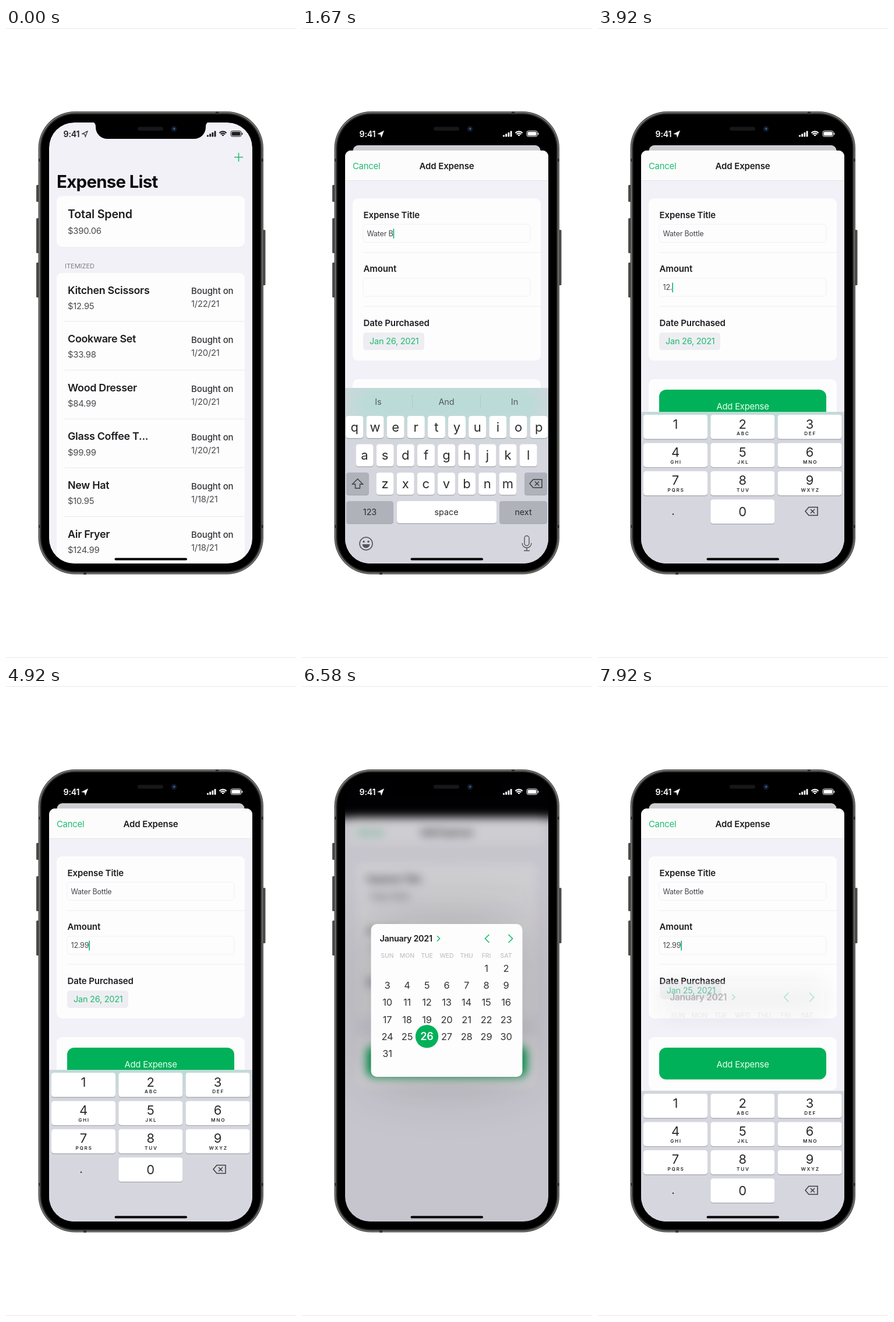
Write an HTML page with a canvas that moves like this. It is 498x1080 px and loops after 8 s.

```html
<!DOCTYPE html>
<html lang="en">
<head>
<meta charset="utf-8">
<title>Expense List</title>
<style>
  html, body { margin: 0; width: 100%; height: 100%; overflow: hidden; background: #fff; }
  canvas { display: block; width: 498px; height: 1080px; }
</style>
</head>
<body>
<canvas id="stage" width="498" height="1080"></canvas>
<script>
const W = 498, H = 1080, LOOP = 8000;
const GREEN = '#00b159', TINT = '#1dbb70', INK = '#1d1d20', GROUND = '#f2f1f7', CARD = '#fdfdfe';
const SHEET_OPEN = 542, SWITCH = 2400, PICKER_OPEN = 5530, DAY_TAP = 7000, PICKER_CLOSE = 7716;
const main = document.getElementById('stage').getContext('2d');
const buffer = Object.assign(document.createElement('canvas'), { width: W, height: H });
const back = buffer.getContext('2d');
let g = main;

const clamp = v => Math.max(0, Math.min(1, v));
const lerp = (a, b, k) => a + (b - a) * k;
// Critically damped spring from 0 to 1, starting at `start` ms.
const spring = (t, start) => {
  const x = Math.max(0, t - start) * 0.017;
  return 1 - (1 + x) * Math.exp(-x);
};

function text(s, x, y, size, color = INK, weight = 400, spacing = 0, align = 'left') {
  g.font = `${weight} ${size}px Inter, sans-serif`;
  g.letterSpacing = spacing + 'px';
  g.textAlign = align;
  g.fillStyle = color;
  g.fillText(s, x, y + size * 0.364);
  return g.measureText(s).width;
}
const label = (s, x, y, size, color, weight, spacing) => text(s, x, y, size, color, weight, spacing, 'center');

function box(x, y, w, h, r, fill, stroke) {
  g.beginPath();
  g.roundRect(x, y, w, h, r);
  if (fill) { g.fillStyle = fill; g.fill(); }
  if (stroke) { g.strokeStyle = stroke; g.lineWidth = 1; g.stroke(); }
}
function line(points, color, width = 1.5, fill) {
  g.beginPath();
  points.forEach(([x, y], i) => i ? g.lineTo(x, y) : g.moveTo(x, y));
  if (fill) { g.closePath(); g.fillStyle = fill; g.fill(); }
  g.strokeStyle = color;
  g.lineWidth = width;
  g.stroke();
}
function arc(x, y, r, from, to, color, width = 1.4) {
  g.beginPath();
  g.arc(x, y, r, from * Math.PI, to * Math.PI);
  g.strokeStyle = color;
  g.lineWidth = width;
  g.stroke();
}
function disc(x, y, r, color) {
  g.beginPath();
  g.arc(x, y, r, 0, 7);
  g.fillStyle = color;
  g.fill();
}
function group(draw) { g.save(); draw(); g.restore(); }

// ---- Expense list ----
const EXPENSES = [
  ['Kitchen Scissors', '$12.95', '1/22/21'], ['Cookware Set', '$33.98', '1/20/21'],
  ['Wood Dresser', '$84.99', '1/20/21'], ['Glass Coffee T...', '$99.99', '1/20/21'],
  ['New Hat', '$10.95', '1/18/21'], ['Air Fryer', '$124.99', '1/18/21'],
];
function drawList(q) {
  group(() => {
    const scale = lerp(1, 0.9226, q);
    g.translate(248.5, 162 + 39 * q);
    g.scale(scale, scale);
    g.translate(-248.5, -162);
    const radius = lerp(43, 10, q);
    box(74, 162, 349, 780, radius, GROUND);
    const plus = q > 0.4 ? '#a9a9b4' : TINT;
    line([[392, 221.5], [407, 221.5]], plus);
    line([[399.5, 214], [399.5, 229]], plus);
    text('Expense List', 87, 263.5, 29.5, '#0c0c0e', 700, -0.75);
    box(87, 288, 323, 87, 9, CARD);
    text('Total Spend', 106, 319, 19.7, INK, 600, -0.2);
    text('$390.06', 106, 348, 14.8, '#4b4b4f', 400, -0.2);
    text('ITEMIZED', 101, 408, 11, '#7d7d83');
    box(87, 420, 323, 560, 9, CARD);
    EXPENSES.forEach(([name, price, date], i) => {
      const y = 83.6 * i;
      text(name, 106, 449 + y, 17.9, INK, 600, -0.3);
      text(price, 106, 476.5 + y, 14.8, '#4b4b4f', 400, -0.2);
      text('Bought on', 318, 451 + y, 15, '#333337', 500, -0.1);
      text(date, 318, 473 + y, 14.8, '#4b4b4f', 400, -0.2);
      line([[100, 503 + y], [410, 503 + y]], '#e9e9ed', 1);
    });
    if (q) box(74, 162, 349, 780, radius, `rgba(0,0,0,${0.15 * q})`);
  });
}

// ---- Typing ----
const TITLE = 'Water Bottle';
const PRESSES = [[3150, '1'], [3450, '2'], [3750, '.'], [4220, '9'], [4580, '9']];
const titleLength = t => Math.max(0, Math.min(TITLE.length, Math.floor((t - 980) / 95)));
const amountAt = t => PRESSES.filter(p => p[0] <= t).map(p => p[1]).join('');

function caretVisible(t) {
  const last = Math.max(SHEET_OPEN, t >= SWITCH ? SWITCH : 0,
    t > 1075 ? Math.min(t, 2120) : 0, ...PRESSES.map(p => p[0]).filter(x => x <= t));
  return t > PICKER_CLOSE || (t - last) % 1000 < 560;
}

// ---- Add Expense sheet ----
function drawField(name, value, y, caret) {
  text(name, 105.5, y - 31.5, 15, INK, 600, -0.1);
  box(105, y - 15.5, 287, 31, 5, CARD, '#f1f1f4');
  const width = value ? text(value, 111.5, y, 12.5, '#47474b', 400, -0.2) : 0;
  if (caret) box(111.5 + width, y - 8, 1.8, 17, 1, TINT);
}
function drawSheet(t, top, p) {
  group(() => {
    g.translate(0, top - 210);
    box(74, 210, 349, 800, [10, 10, 0, 0], GROUND);
    box(74, 210, 349, 51, [10, 10, 0, 0], '#fcfcfd');
    line([[74, 261.5], [423, 261.5]], '#e6e6ea', 1);
    text('Cancel', 87, 236.5, 14.8, TINT, 400, -0.2);
    label('Add Expense', 248.5, 236.5, 15, INK, 600, -0.1);
    box(87, 292, 323, 278, 9, CARD);
    const blink = caretVisible(t);
    drawField('Expense Title', TITLE.slice(0, titleLength(t)), 352, t < SWITCH && blink);
    drawField('Amount', amountAt(t), 444.5, t >= SWITCH && blink);
    line([[105, 385], [410, 385]], '#ededf1', 1);
    line([[105, 477], [410, 477]], '#ededf1', 1);
    group(() => {
      g.globalAlpha = clamp(1.15 - p * 1.3);
      g.translate(p * 12, -110 * p);
      box(105, 522, 105, 30, 5, '#eeeef2');
      text(t > DAY_TAP ? 'Jan 25, 2021' : 'Jan 26, 2021', 116, 537, 14.5, TINT, 400, -0.25);
    });
    text('Date Purchased', 105.5, 505.5, 15, INK, 600, -0.1);
    box(87, 602, 323, 91, 9, CARD);
    box(105, 620, 287, 54.5, 12, GREEN);
    label('Add Expense', 248.5, 648.5, 14.8, '#e9fff3', 400, -0.2);
  });
}

// ---- Keyboards ----
function key(x, y, w, h, fill = '#fff') {
  box(x, y + 1.2, w, h, 4.5, '#a2a4ab');
  box(x, y, w, h, 4.5, fill);
}
function backspace(x, y) {
  line([[x - 11, y], [x - 5, y - 7], [x + 10, y - 7], [x + 10, y + 7], [x - 5, y + 7], [x - 11, y], [x - 5, y - 7]], '#3b3b3f');
  line([[x - 2, y - 3.5], [x + 5, y + 3.5]], '#3b3b3f');
  line([[x - 2, y + 3.5], [x + 5, y - 3.5]], '#3b3b3f');
}
function drawLetters(t) {
  const upper = titleLength(t) === 0, gray = '#b0b2bb';
  const words = upper ? ['I', 'Yeah', 'The'] : ['Is', 'And', 'In'];
  words.forEach((word, i) => label(word, 131 + 117 * i, 641, 14.5, '#55585c', 400, -0.1));
  [189.5, 306.5].forEach(x => line([[x, 629], [x, 651]], '#b9c3c6', 1));
  ['qwertyuiop', 'asdfghjkl', 'zxcvbnm'].forEach((row, r) => {
    const y = 665 + 48.6 * r;
    [...row].forEach((c, i) => {
      const x = [90.3, 107.5, 142.5][r] + 35.15 * i;
      key(x - 15, y, 30, 38);
      label(upper ? c.toUpperCase() : c, x, y + (upper ? 19.5 : 18.5), upper ? 20 : 22, '#2b2b2e');
    });
  });
  key(76, 762, 39, 38, upper ? '#fff' : gray);
  line([[95.5, 773], [104.5, 782], [99.5, 782], [99.5, 789], [91.5, 789], [91.5, 782], [86.5, 782], [95.5, 773]],
    upper ? '#000' : '#3b3b3f', 1.4, upper ? '#000' : gray);
  key(382, 762, 39, 38, gray);
  backspace(402, 781);
  key(76, 811, 81, 38, gray);
  key(163, 811, 171, 38);
  key(339, 811, 82, 38, gray);
  label('123', 116.5, 830, 14.3, '#2b2b2e');
  label('space', 248, 829.5, 14.3, '#2b2b2e');
  label('next', 380, 829.5, 14.3, '#2b2b2e');
  const icon = '#54565b';
  arc(110, 884, 11, 0, 2, icon, 1.6);
  disc(106, 880.5, 1.7, icon);
  disc(114, 880.5, 1.7, icon);
  g.beginPath();
  g.arc(110, 885, 6.5, 0, Math.PI);
  g.fillStyle = icon;
  g.fill();
  g.beginPath();
  g.roundRect(382, 870.5, 8, 17, 4);
  g.strokeStyle = icon;
  g.lineWidth = 1.4;
  g.stroke();
  arc(386, 883, 8, 0, 1, icon);
  line([[386, 891], [386, 896]], icon);
  line([[381, 896], [391, 896]], icon);
}
function drawDigits(t) {
  const held = c => PRESSES.some(p => p[1] === c && t >= p[0] && t < p[0] + 170);
  const letters = ['', 'ABC', 'DEF', 'GHI', 'JKL', 'MNO', 'PQRS', 'TUV', 'WXYZ'];
  const columns = [78, 193.3, 308.6];
  letters.forEach((s, i) => {
    const x = columns[i % 3], y = 663 + 48.4 * Math.floor(i / 3), digit = String(i + 1);
    key(x, y, 110, 41.5, held(digit) ? '#b0b2bb' : '#fff');
    label(digit, x + 55, y + 15.5, 22, '#2b2b2e');
    label(s, x + 56, y + 32.5, 8.2, '#2b2b2e', 600, 1.7);
  });
  key(193.3, 808.3, 110, 41.5);
  label('0', 248.3, 829, 22, '#2b2b2e');
  if (held('.')) key(78, 808.3, 110, 41.5);
  disc(129, 833.5, 1.2, '#2b2b2e');
  backspace(367, 828.5);
}
function drawKeyboard(t, q, p, sheetTop) {
  const swap = clamp((t - SWITCH) / 200);
  const shift = (1 - q) * 301 + p * 262;
  if (shift > 300) return;
  const top = lerp(617, 658, swap) + shift;
  group(() => {
    g.beginPath();
    g.rect(74, top, 349, 400);
    g.clip();
    box(74, top, 349, 400, 0, '#d5d6de');
    // The green button glows through the translucent panel.
    g.filter = 'blur(17px)';
    box(82, sheetTop + 398, 333, 74, 10, 'rgba(120,232,196,.28)');
    g.filter = 'none';
    g.translate(0, shift);
    if (swap < 1) { g.globalAlpha = 1 - swap; drawLetters(t); }
    if (swap > 0) { g.globalAlpha = swap; drawDigits(t); }
  });
}

// ---- Calendar ----
function drawCalendar(t, p) {
  const x = lerp(105, 118.5, p), y = lerp(522, 408, p), w = lerp(286, 260, p), h = lerp(30, 262, p);
  const selected = t > DAY_TAP ? 25 : 26;
  group(() => {
    g.globalAlpha = clamp(p * 2);
    g.shadowColor = 'rgba(0,0,0,.2)';
    g.shadowBlur = lerp(20, 110, p);
    box(x, y, w, h, 10, '#fdfdfd');
    g.shadowColor = 'transparent';
    g.clip();
    g.translate(x, y);
    g.scale(w / 260, w / 260);
    g.translate(-118.5, -408);
    text('January 2021', 133.5, 433, 14.4, INK, 600, -0.32);
    line([[232, 428.5], [236.5, 433], [232, 437.5]], TINT, 1.7);
    line([[321.5, 426], [314.5, 433], [321.5, 440]], TINT, 1.7);
    line([[354.5, 426], [361.5, 433], [354.5, 440]], TINT, 1.7);
    ['SUN', 'MON', 'TUE', 'WED', 'THU', 'FRI', 'SAT'].forEach((d, i) =>
      label(d, 146.5 + 34 * i, 462, 10.4, '#c3c3c8', 500));
    for (let day = 1; day <= 31; day++) {
      const cell = day + 4, dx = 146.5 + 34 * (cell % 7), dy = 484 + 29.2 * Math.floor(cell / 7);
      const on = day === selected;
      if (on) disc(dx, dy, 19.7, GREEN);
      label(String(day), dx, dy, on ? 18 : 16.4, on ? '#fff' : day === 26 ? TINT : '#333337', on ? 600 : 400, -0.2);
    }
  });
}

// ---- Phone ----
function drawBody() {
  g.fillStyle = '#fff';
  g.fillRect(0, 0, W, H);
  g.fillStyle = '#e6e6e6';
  g.fillRect(0, 0, W, 1);
  g.fillRect(0, 1079, W, 1);
  [[52, 269, 29], [52, 326, 60], [52, 402, 60], [441, 346, 95]].forEach(([x, y, h]) => box(x, y, 4.5, h, 1.5, '#494a48'));
  box(55.5, 143, 386.5, 793.5, 63, '#4d4e4b');
  box(57, 144.5, 383.5, 790.5, 61.5, '#858682');
  box(58.2, 145.7, 381.1, 788.1, 60.5, '#2d2e2c');
  box(60.5, 148, 376.5, 783.5, 58, '#000');
  [[56, 224, 4, 5], [438, 224, 4, 5], [56, 852, 4, 5], [438, 852, 4, 5], [360, 143, 5, 4], [133, 933, 5, 4]]
    .forEach(([x, y, w, h]) => box(x, y, w, h, 0, '#343533'));
}
function drawStatus(q) {
  const v = Math.round(lerp(30, 255, q ** 3)), c = `rgb(${v},${v},${v})`;
  text('9:41', 98.5, 181.5, 14.2, c, 600, -0.2);
  line([[131, 181.5], [140, 177], [136.3, 186.5], [135.3, 182.2], [131, 181.5]], c, 1.1, q > 0.5 ? c : 'transparent');
  for (let i = 0; i < 4; i++) box(345 + 4.2 * i, 183.5 - 2.3 * i, 2.9, 3 + 2.3 * i, 0.8, c);
  [2, 5.3, 8.6].forEach(r => arc(372.5, 186, r, 1.25, 1.75, c, 2.2));
  box(386, 176.5, 18, 9.5, 2.8, null, c);
  box(387.5, 178, 15, 6.5, 1.5, c);
  box(405, 179.5, 1.3, 3.5, 0.6, c);
}
function drawNotch() {
  g.beginPath();
  g.moveTo(147, 160);
  g.lineTo(350, 160);
  g.quadraticCurveTo(343, 162, 343, 169);
  g.arcTo(343, 190, 322, 190, 20);
  g.arcTo(154, 190, 154, 169, 20);
  g.lineTo(154, 169);
  g.quadraticCurveTo(154, 162, 147, 160);
  g.fillStyle = '#000';
  g.fill();
  box(226, 169.5, 44, 6.5, 3.2, '#171719');
  disc(288.5, 173, 5, '#101624');
  disc(288.5, 173, 2.4, '#1d3d5c');
  disc(289.3, 172.3, 0.9, '#4f8fae');
}

function render(t) {
  const q = spring(t, SHEET_OPEN);
  const p = spring(t, PICKER_OPEN) - spring(t, PICKER_CLOSE);
  const haze = clamp((p - 0.15) / 0.85);
  const sheetTop = lerp(918, 210, q);

  g = back;
  g.fillStyle = '#000';
  g.fillRect(0, 0, W, H);
  drawList(q);
  if (haze) {
    box(0, 0, W, 226, 0, `rgba(0,0,0,${haze})`);
    box(40, 226, 420, 760, 0, GROUND);
  }
  group(() => {
    const scale = 1 - 0.043 * haze;
    g.translate(248.5, 560);
    g.scale(scale, scale);
    g.translate(-248.5, -560);
    if (q) drawSheet(t, sheetTop, p);
  });

  g = main;
  drawBody();
  group(() => {
    g.beginPath();
    g.roundRect(74, 162, 349, 756, 43);
    g.clip();
    if (haze) g.filter = `blur(${8 * haze}px)`;
    g.drawImage(buffer, 0, 0);
    g.filter = 'none';
    if (q) drawKeyboard(t, q, p, sheetTop);
    if (haze) box(74, 162, 349, 756, 0, `rgba(8,0,16,${0.19 * haze})`);
    if (p > 0.004) drawCalendar(t, p);
    drawStatus(q);
    box(186.5, 908.5, 124.5, 4, 2, '#000');
  });
  drawNotch();
}

const start = performance.now();
function tick() {
  render((performance.now() - start) % LOOP);
  requestAnimationFrame(tick);
}
tick();
</script>
</body>
</html>
```
